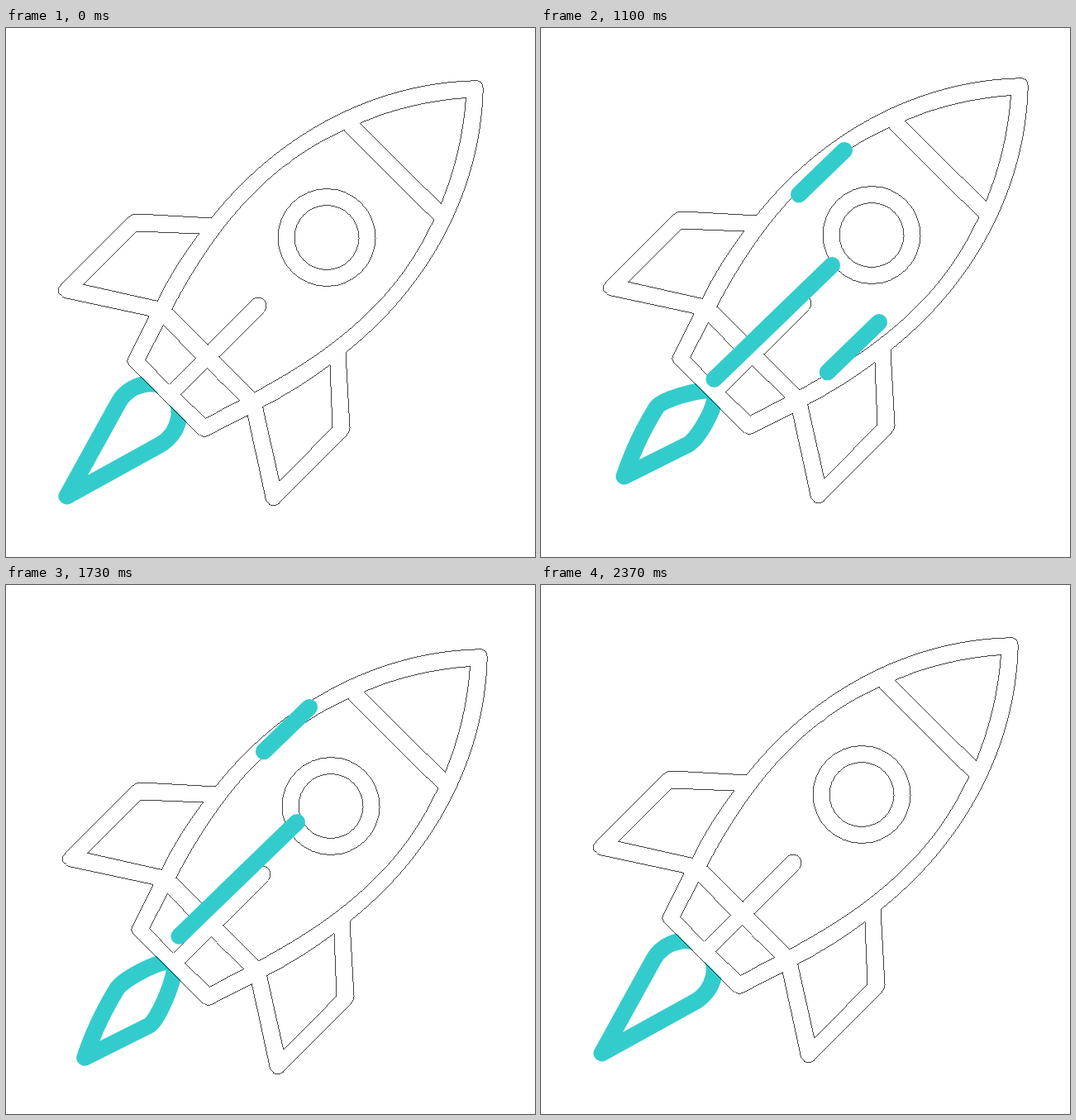
These frames come from a looping animation (640x640 px, 2.5 s). An HTML page:

```html
<!DOCTYPE html>
<html>
<head>
<meta charset="utf-8">
<title>Rocket</title>
<style>
  html, body { margin: 0; width: 100%; height: 100%; overflow: hidden; background: #fff; }
  svg { display: block; width: 640px; height: 640px; }
  .teal { fill: none; stroke: #3cc; stroke-width: 20; stroke-linecap: round; stroke-linejoin: round; }
  .hull { fill: #fff; stroke: #000; stroke-width: .75; shape-rendering: crispEdges; }
</style>
</head>
<body>
<svg viewBox="0 0 640 640">
  <defs>
    <path id="shell" d="M574.5 65.5Q571.5 63 567 63.3C447 66 330 126 248 229.5L158 224.5Q152.5 224 148.5 228L65.5 310Q60.5 316 64 321.5Q66.5 325 72 326.5L172 348L147 398Q144.5 402 148 406L191 449"/>
    <g id="panels" fill="none">
      <path d="M233 248.5L157 245.5L93 310L182.5 330Q203 288 233 248.5"/>
      <path d="M463 177L409 123C330 158 262 222 200 340L243.5 383L297.5 328.5A10 10 0 0 1 311.6 328.4"/>
      <path d="M477 163L428 114C470 97 512 87 556.5 84"/>
      <path d="M190 358L229 398L197 430L168 400Z"/>
    </g>
  </defs>
  <g id="rocket">
    <path id="flame" class="teal"/>
    <g class="hull">
      <use href="#shell"/>
      <use href="#shell" transform="matrix(0 -1 -1 0 640 640)"/>
      <use href="#panels"/>
      <use href="#panels" transform="matrix(0 -1 -1 0 640 640)"/>
      <circle cx="387.5" cy="253" r="59"/>
      <circle cx="387.5" cy="253" r="39"/>
    </g>
  </g>
  <path id="streaks" class="teal"/>
</svg>
<script>
const LOOP = 2500, FPS = 30;
const $ = id => document.getElementById(id);
const mix = (a, b, u) => a + (b - a) * u;
const clamp = (v, max = 1) => Math.min(max, Math.max(0, v));

// The rocket rattles along a smooth curve, three frames per stop.
const HOME = [0, 0], LEFT = [-7, 5], TOP = [15, -12.6], LOW = [-.5, 23];
const ORBIT = [LEFT, TOP, LOW];
const route = [HOME, LEFT, LOW, ...ORBIT, ...ORBIT, ...ORBIT, HOME, TOP, HOME];
const stop = i => route[i] || HOME;

function catmullRom(a, b, c, d, u) {
  return b + u / 2 * (c - a + u * (2 * a - 5 * b + 4 * c - d + u * (3 * (b - c) + d - a)));
}

function shake(f) {
  const s = (f - 20) / 3, i = Math.floor(s);
  const strength = clamp(Math.min(f - 21, 62 - f) / 3);
  return [0, 1].map(axis => Math.round(strength *
    catmullRom(...[-1, 0, 1, 2].map(n => stop(i + n)[axis]), s - i)));
}

// A calm teardrop narrows to a short blade that slowly stretches back.
function flamePath(f) {
  const k = clamp(Math.min((f - 22) / 5, (69 - f) / 6));
  const pull = 18 * clamp((71 - f) / 27);
  const sway = mix(-3, 4, clamp((f - 33) / 12));
  const tx = 73 + k * (sway + pull), ty = 566 + k * (sway - pull);
  const lx = tx + mix(63, 39, k), ly = ty - mix(114, 83, k);
  const rx = tx + mix(114, 78, k), ry = ty - mix(63, 39, k);
  const long = mix(21, 10, k), short = mix(12, 6, k);
  return `M${tx} ${ty}Q${mix(tx, lx, .5) - 5 * k} ${mix(ty, ly, .5) - 2 * k} ${lx} ${ly}` +
    `C${lx + short} ${ly - long} ${mix(180, 175, k)} ${mix(421, 440, k)} 199 440` +
    `C${mix(218, 200, k)} ${mix(459, 464, k)} ${rx + long} ${ry - short} ${rx} ${ry}Z`;
}

// Streaks slide down-left; the tail leaves a few frames after the head.
const SLOPE = .967, REPEAT = 19;
const streaks = [
  { x: 367, y: 148, run: 178, speed: 14.3, lag: 3.85, start: 29.15, passes: 2 },
  { x: 352, y: 287, run: 212, speed: 19.8, lag: 7.2, start: 25.8, passes: 2 },
  { x: 540, y: 162, run: 227, speed: 22, lag: 6.5, start: 34.2, passes: 2 },
  { x: 409, y: 356, run: 144, speed: 16, lag: 4, start: 29.1, passes: 1 }
];

function streakPath({ x, y, run, speed, lag, start, passes }, f) {
  const at = d => `${x - d} ${y + d * SLOPE}`;
  let path = '';
  for (let pass = 0; pass < passes; pass++) {
    const age = f - start - pass * REPEAT;
    const head = clamp(age * speed, run), tail = clamp((age - lag) * speed, run);
    if (head > tail) path += `M${at(tail)}L${at(head)}`;
  }
  return path;
}

function draw(now) {
  const f = Math.floor((now % LOOP + 3.4) * FPS / 1000);
  const [dx, dy] = shake(f);
  $('rocket').setAttribute('transform', `translate(${dx + .5} ${dy + .5})`);
  $('flame').setAttribute('d', flamePath(f));
  $('streaks').setAttribute('d', streaks.map(s => streakPath(s, f)).join(''));
}

const begin = performance.now();
function tick() {
  draw(performance.now() - begin);
  requestAnimationFrame(tick);
}
tick();
</script>
</body>
</html>
```
